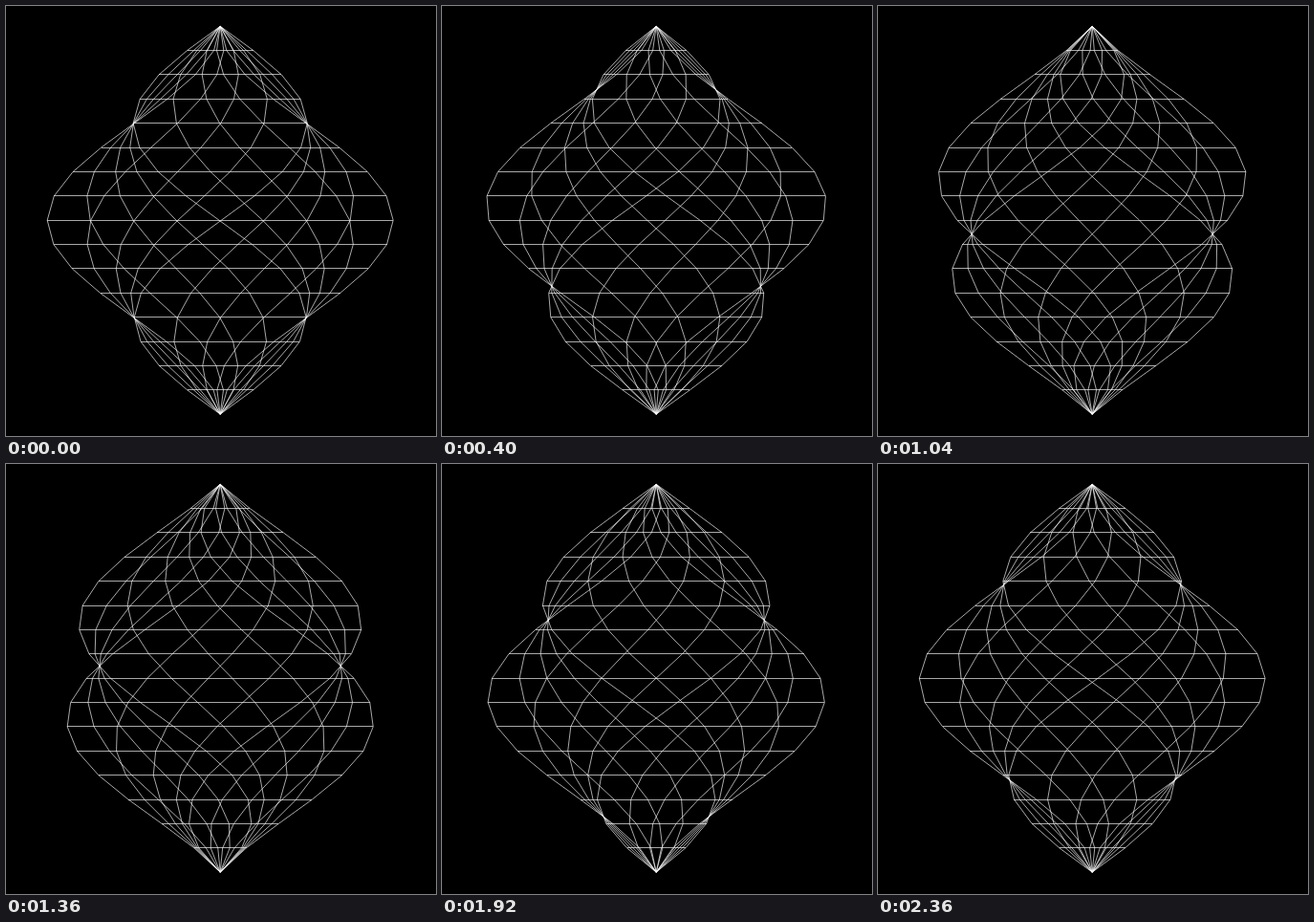
An HTML page for the animation above (2.4 s loop, 450 by 450 pixels).

```html
<!DOCTYPE html>
<html lang="en">
<head>
<meta charset="utf-8">
<title>Twisting wireframe</title>
<style>
  html, body { margin: 0; width: 100%; height: 100%; overflow: hidden; background: #000; }
  svg { display: block; width: 100%; height: 100%; }
  path { fill: none; stroke: #fff; stroke-opacity: .66; stroke-width: 1; stroke-linejoin: bevel; }
  .rungs { shape-rendering: crispEdges; }
</style>
</head>
<body>
<svg id="stage" viewBox="0 0 450 450"></svg>
<script>
const LOOP = 2400, STEP = 40, LAG = 10;
const LEVELS = 16, SPLIT = 4;
const MID = 224.2, HEIGHT = 203, RADIUS = 181;
const stage = document.getElementById('stage');

// Points along the four edges of a square with corners on the unit circle.
const ring = [];
for (let side = 0; side < 4; side++) {
  const a = side * Math.PI / 2, b = a + Math.PI / 2;
  for (let j = 0; j < SPLIT; j++) {
    const u = j / SPLIT;
    ring.push({
      x: Math.cos(a) * (1 - u) + Math.cos(b) * u,
      z: Math.sin(a) * (1 - u) + Math.sin(b) * u
    });
  }
}

function makePath() {
  const el = document.createElementNS('http://www.w3.org/2000/svg', 'path');
  return stage.appendChild(el);
}

const rungs = makePath();
rungs.setAttribute('class', 'rungs');
const strands = ring.map(makePath);

// One horizontal slice: the square, turned further on every level.
function slice(i, turn) {
  const v = i / (LEVELS / 2) - 1;
  const angle = (v + turn) * Math.PI / 2;
  const r = RADIUS * Math.sin(Math.PI * i / LEVELS);
  const c = Math.cos(angle), s = Math.sin(angle);
  return {
    y: MID + HEIGHT * v,
    xs: ring.map(p => MID + r * (p.x * c - p.z * s))
  };
}

const point = (x, y) => x.toFixed(2) + ' ' + y.toFixed(2);

function draw(ms) {
  const time = Math.floor(ms % LOOP / STEP) * STEP;
  const turn = (time - LAG) / LOOP;
  const rows = Array.from({ length: LEVELS + 1 }, (_, i) => slice(i, turn));
  rungs.setAttribute('d', rows.slice(1, -1).map(({ y, xs }) =>
    'M' + point(Math.min(...xs), y) + 'L' + point(Math.max(...xs), y)).join(''));
  strands.forEach((el, k) =>
    el.setAttribute('d', 'M' + rows.map(({ y, xs }) => point(xs[k], y)).join('L')));
}

const start = performance.now();
function tick() {
  draw(performance.now() - start);
  requestAnimationFrame(tick);
}
draw(0);
requestAnimationFrame(tick);
</script>
</body>
</html>
```
